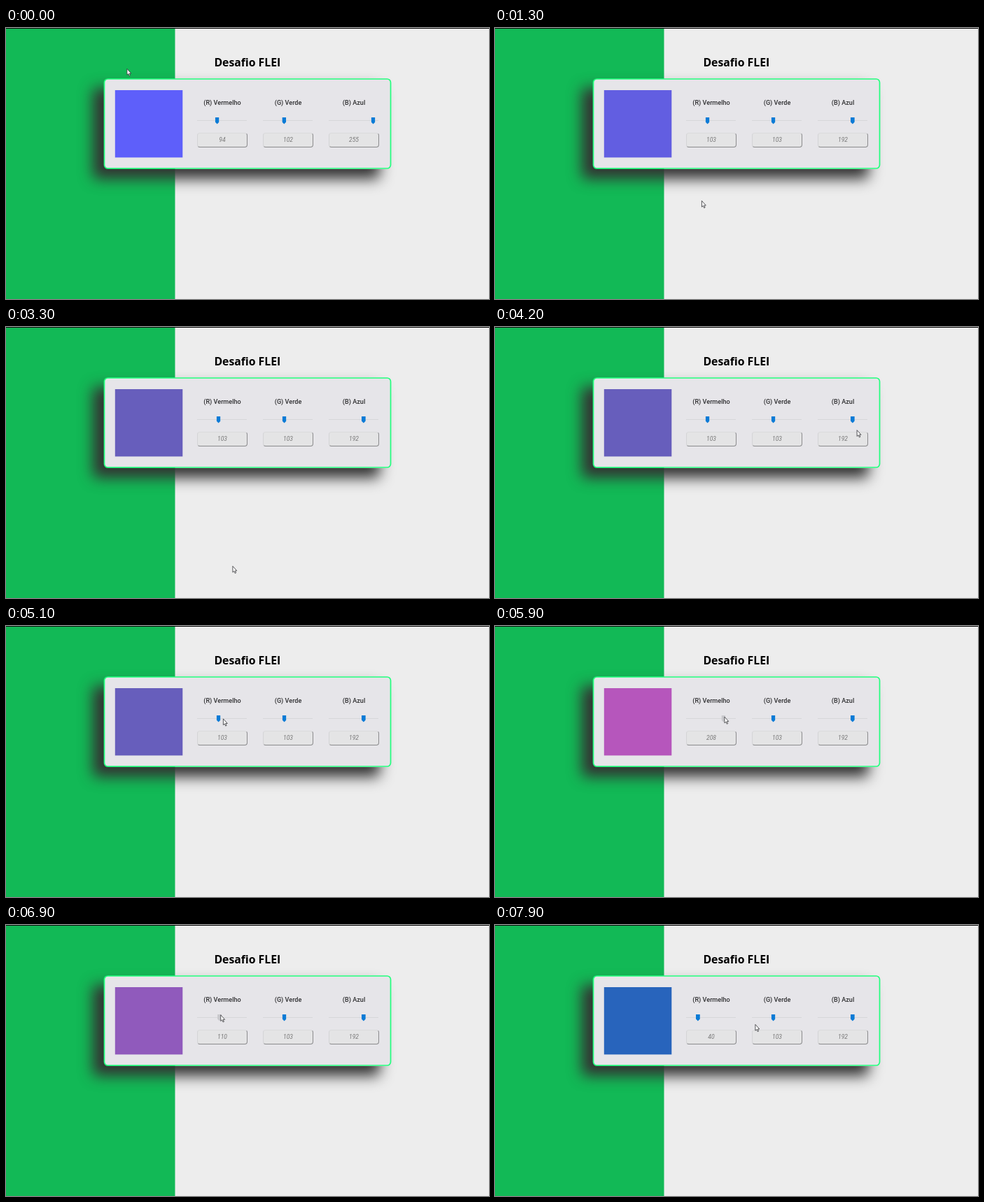
An HTML page for the animation above (8 s loop, 690x388 px).

```html
<!DOCTYPE html>
<html lang="pt">
<head>
<meta charset="utf-8">
<title>Desafio</title>
<style>
  html, body { margin: 0; width: 100%; height: 100%; overflow: hidden; background: #ededed; }
  #stage { position: relative; width: 690px; height: 388px; overflow: hidden;
    background: linear-gradient(90deg, #12b956 241px, #ededed 242px); }
  #stage::before { content: ""; position: absolute; width: 100%; height: 1px; background: #0c0c0c; }
  h1 { position: absolute; left: 297.4px; top: 38px; margin: 0; white-space: nowrap; color: #000;
    font: 700 15.8px/22px "Open Sans", sans-serif; }
  #shadow { position: absolute; left: 140px; top: 72px; width: 410px; height: 130px;
    border-radius: 6px; box-shadow: -16px 14px 20px #333; }
  svg { position: absolute; left: 0; top: 0; overflow: visible; }
  .channel { position: absolute; top: 0; width: 72px; font-family: Roboto, sans-serif; text-align: center; }
  .label { position: absolute; left: -10px; top: 101px; width: 92px; color: #2e2e30;
    font-size: 9.1px; font-weight: 500; line-height: 12px; white-space: nowrap; }
  .track { position: absolute; left: 0; top: 132px; width: 71px; height: 1px; background: #d6d6d9; }
  .thumb { position: absolute; left: 0; top: 127.5px; width: 6px; height: 10px;
    clip-path: polygon(0 0, 100% 0, 100% 70%, 50% 100%, 0 70%); }
  .value { position: absolute; left: 0; top: 150px; width: 70px; height: 19px;
    border: 1px solid; border-color: #dadadc #8b8b8d #8b8b8d #d4d4d6; border-radius: 4px;
    background: #e4e4e5; color: #777; font-size: 8.5px; font-style: italic; line-height: 19px; }
</style>
</head>
<body>
<div id="stage">
  <h1>Desafio FLEI</h1>
  <div id="shadow"></div>
  <svg width="690" height="388">
    <rect x="140.5" y="73" width="409" height="128" rx="5" fill="#e6e5e9" stroke="#22ff7d" stroke-width="1.7"/>
    <rect id="swatch" x="155.8" y="89" width="96.5" height="96.4"/>
  </svg>
  <svg id="cursor" width="8" height="12">
    <path d="M.4 .4V9.2L2.3 7.5 3.7 10.6 5.1 10 3.7 7H6.3Z" fill="#fff" stroke="#303034" stroke-width=".8"/>
  </svg>
</div>
<script>
const LOOP = 8000, STEP = 100;
const RESET = 1300, GRAB = 5200, DROP = 7375;
const SCALE = .217; // slider pixels per unit

// Pointer stops: time, x, y
const stops = [
  [0, 172.5, 58], [900, 295, 247], [RESET, 295, 247], [2000, 301.8, 249],
  [2800, 318, 297], [3300, 323.5, 342], [3900, 555, 150], [5100, 310, 132.5],
  [GRAB, 304.7, 132], [6200, 333.8, 129], [DROP, 291, 128], [7900, 371.5, 142]
];

const ease = u => u * u * (3 - 2 * u);
const clamp = (v, lo, hi) => Math.min(hi, Math.max(lo, v));

function pointer(t) {
  const i = Math.max(1, stops.findIndex(s => s[0] >= t));
  const [t0, x0, y0] = stops[i - 1], [t1, x1, y1] = stops[i];
  const u = ease(clamp((t - t0) / (t1 - t0), 0, 1));
  return [x0 + (x1 - x0) * u, y0 + (y1 - y0) * u];
}

// The red slider follows the pointer while it is held.
const red = t => t < RESET ? 94 : (pointer(clamp(t, GRAB, DROP))[0] - 282.35) / SCALE;
const green = t => t < RESET ? 102 : 103;
const blue = t => t < RESET ? 255 : 192;

// The swatch trails the sliders.
function trail(level, t) {
  let sum = 0, total = 0;
  for (let k = 0; k < 10; k++) {
    const w = Math.exp(-k / 2);
    sum += w * level(t - k * STEP);
    total += w;
  }
  return sum / total;
}

const stage = document.getElementById("stage");
const swatch = document.getElementById("swatch");
const cursor = document.getElementById("cursor");

function add(parent, name, text = "") {
  const el = document.createElement("div");
  el.className = name;
  el.textContent = text;
  parent.append(el);
  return el;
}

const channels = [["(R) Vermelho", red], ["(G) Verde", green], ["(B) Azul", blue]].map(([label, level], i) => {
  const box = add(stage, "channel");
  box.style.left = 273 + 94 * i + "px";
  add(box, "label", label);
  add(box, "track");
  return { level, thumb: add(box, "thumb"), value: add(box, "value") };
});
stage.append(cursor);

function draw(t) {
  const held = t >= GRAB && t <= DROP;
  channels.forEach(({ level, thumb, value }) => {
    const v = Math.round(level(t));
    value.textContent = v;
    thumb.style.transform = `translateX(${5.2 + SCALE * v}px)`;
    thumb.style.background = held && level === red ? "#c8c8cc" : "#0a7bd6";
  });
  const r = trail(red, t);
  swatch.style.fill = `rgb(${r}, ${104 - .1 * r}, ${.98 * trail(blue, t)})`;
  const [x, y] = pointer(t);
  cursor.style.transform = `translate(${x}px, ${y}px)`;
}

const start = performance.now();
function tick() {
  const t = (performance.now() - start) % LOOP;
  draw(Math.floor(t / STEP) * STEP);
  requestAnimationFrame(tick);
}
tick();
</script>
</body>
</html>
```
